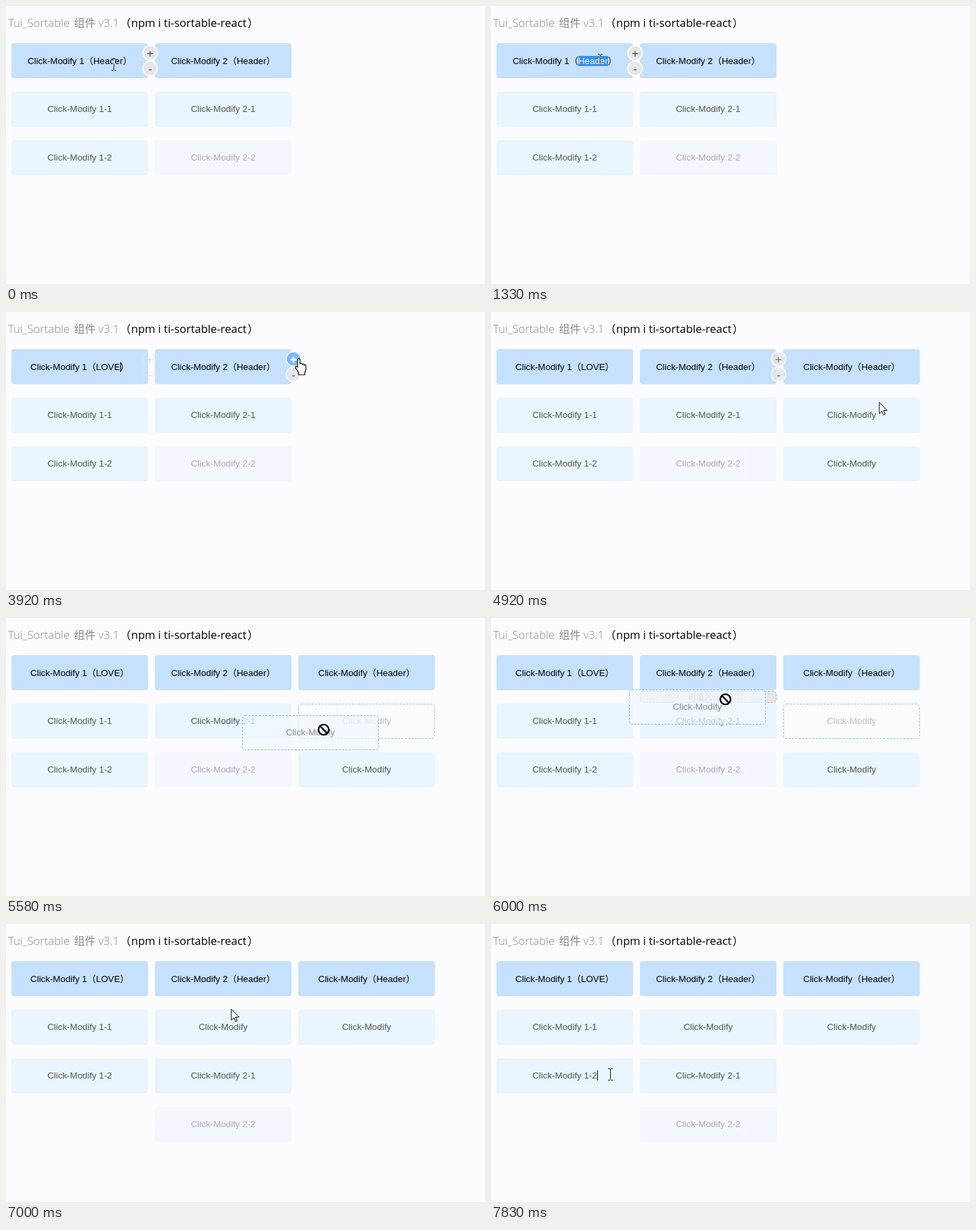
Write an HTML page that moves like this. It is 708 px wide and 412 px high and loops after 8000 ms.

```html
<!DOCTYPE html>
<html lang="zh-CN">
<head>
<meta charset="utf-8">
<title>Sortable</title>
<style>
  html, body { margin: 0; width: 100%; height: 100%; overflow: hidden; background: #fcfcff; }
  svg { display: block; width: 708px; height: 412px; }
  text { font: 13.333px "Liberation Sans", Arial, "Noto Sans CJK SC", sans-serif; white-space: pre; }
  .title { font: 16.5px "Open Sans", "Noto Sans CJK SC", sans-serif; }
  .title .name { font-size: 16.7px; font-weight: 300; fill: #888; }
  .title .cjk { font-family: "Noto Sans CJK SC", sans-serif; font-size: 16px; }
  .mid { text-anchor: middle; }
  .slot { font-size: 12px; }
  .sign { font-size: 17px; text-anchor: middle; }
  .ibeam { mix-blend-mode: difference; }
</style>
</head>
<body>
<svg id="stage" viewBox="0 0 708 412"></svg>
<script>
const LOOP = 8000, STEP = 1000 / 12;
const W = 202, H = 52;
const colX = c => 8 + c * 212;
const rowY = r => 55 + r * 72;

// Moments in units of 1/12 s
const CLICK = 14, SELECT = 16, TYPE = 23, HOVER = 40, ADD = 48, LEAVE = 56.5;
const DRAG = 66, SLOT = 71, DROP = 79, EDIT = 94;

const clamp = v => Math.min(1, Math.max(0, v));
const smooth = t => t * t * (3 - 2 * t);
const easeIn = t => t * t;
const easeOut = t => 1 - (1 - t) ** 3;
const span = (k, a, b) => clamp((k - a) / (b - a));
const bump = (k, a, b) => Math.sin(Math.PI * span(k, a, b));

const MOVES = [
  { from: 0, to: 8, x: 161.5, y: 79.5, ease: smooth },
  { from: 37, to: 47, x: 432, y: 69, ease: smooth },
  { from: 55, to: 59, x: 573.5, y: 133, ease: smooth },
  { from: 59, to: 65, x: 576, y: 141, ease: easeOut },
  { from: 65, to: 67, x: 469, y: 165, ease: easeIn },
  { from: 67, to: 75, x: 340, y: 118, ease: easeOut },
  { from: 83, to: 90, x: 205, y: 259, ease: smooth },
  { from: 90, to: 94, x: 176, y: 222, ease: easeOut }
];

function pointerAt(k) {
  let x = 159, y = 86;
  for (const m of MOVES) {
    const f = m.ease(span(k, m.from, m.to));
    x += (m.x - x) * f;
    y += (m.y - y) * f;
  }
  return [x, y - 50 * bump(k, 0, 8)];
}

const fade = (k, from) => smooth(span(k, from, from + 9));
const buttonAlpha = (k, c) => c
  ? fade(k, HOVER) - fade(k, LEAVE)
  : 1 - fade(k, HOVER) - .35 * bump(k, 1, 8);

const box = (x, y, w, h, attrs) =>
  `<rect x="${x}" y="${y}" width="${w}" height="${h}" rx="4" ${attrs}/>`;
const dashed = (x, y, w, h, fill, stroke) =>
  box(x + .5, y + .5, w - 1, h - 1, `fill="${fill}" stroke="${stroke}" stroke-dasharray="3 2"`);
const label = (x, baseline, fill, str) =>
  `<text class="mid" x="${x + W / 2}" y="${baseline}" fill="${fill}">${str}</text>`;
const caret = (x, y) => `<rect x="${x}" y="${y}" width="1" height="15" fill="#000"/>`;

const STYLES = {
  head: { bg: '#c5e1ff', ink: '#000', base: 31 },
  item: { bg: '#e9f5ff', ink: '#555', base: 30 },
  off: { bg: '#f4f7ff', ink: '#aaa', base: 30 }
};

function card(c, r, str, kind = 'item') {
  const { bg, ink, base } = STYLES[kind];
  const x = colX(c), y = rowY(r);
  return box(x, y, W, H, `fill="${bg}"`) + label(x, y + base, ink, str);
}

const TITLE = `<text class="title" y="31">
  <tspan class="name" x="3">Tui_Sortable</tspan><tspan class="name cjk" x="100.5">组件</tspan><tspan class="name" x="136.5">v3.1</tspan>
  <tspan class="cjk" x="168.5">（</tspan><tspan x="185">npm i ti-sortable-react</tspan><tspan class="cjk" x="357">）</tspan></text>`;

function firstHeader(k) {
  const typed = Math.min(4, Math.max(0, Math.floor((k - 20.5) / 2.35)));
  const selected = k >= SELECT && k < TYPE;
  const word = typed ? 'LOVE'.slice(0, typed) : selected ? '<tspan fill="#fff">Header</tspan>' : 'Header';
  let out = box(8, 55, W, H, `fill="${STYLES.head.bg}"`);
  if (selected) out += '<rect x="129" y="74" width="44" height="15" fill="#3390ff"/>';
  out += label(8, 86, '#000', `Click-Modify 1（${word}）`);
  if (k >= CLICK && k < SELECT) out += caret(161, 74);
  const blinkOn = k < 30 || Math.floor((k - 30) / 6) % 2 === 0;
  if (typed && k < ADD && blinkOn) out += caret(Math.floor(151 + 4.5 * typed), 74);
  return out;
}

function thirdColumn(k) {
  const second = k < DROP ? card(2, 2, 'Click-Modify') : '';
  const first = k >= DRAG && k < DROP
    ? dashed(432, 127, W, H, '#fcfcff', '#7cc0f3') + label(432, 157, '#bbb', 'Click-Modify')
    : card(2, 1, 'Click-Modify');
  return `<g opacity="${clamp((k - ADD + 1) / 5)}">` +
    card(2, 0, 'Click-Modify（Header）', 'head') + first + second + '</g>';
}

function cards(k) {
  const shift = k >= DROP ? 1 : 0;
  return firstHeader(k) + card(1, 0, 'Click-Modify 2（Header）', 'head') +
    card(0, 1, 'Click-Modify 1-1') + card(0, 2, 'Click-Modify 1-2') +
    (shift ? card(1, 1, 'Click-Modify') : '') +
    card(1, 1 + shift, 'Click-Modify 2-1') + card(1, 2 + shift, 'Click-Modify 2-2', 'off') +
    (k >= ADD ? thirdColumn(k) : '') + (k >= EDIT ? caret(157, 217) : '');
}

const SIGNS = [['+', 69.5], ['-', 92.5]];
const overButton = (x, y, c, cy) => Math.hypot(x - 213 - c * 212, y - cy) < 11;

function buttons(k, x, y) {
  return [0, 1].map(c => {
    const cx = 213 + c * 212;
    const pair = SIGNS.map(([sign, cy]) => {
      const hot = overButton(x, y, c, cy);
      return `<circle cx="${cx}" cy="${cy}" r="10.75" fill="${hot ? '#69b1ff' : '#e6e6e6'}" stroke="#fff" stroke-width="1.5"/>` +
        `<text class="sign" x="${cx}" y="${cy + 6}" fill="${hot ? '#fff' : '#444'}" stroke="${hot ? '#fff' : 'none'}">${sign}</text>`;
    });
    return `<g opacity="${clamp(buttonAlpha(k, c))}">${pair.join('')}</g>`;
  }).join('');
}

function ghost(k) {
  if (k < DRAG || k >= DROP) return '';
  const [px, py] = pointerAt(k - .25);  // trails the pointer slightly
  const x = Math.round(px - 145), y = Math.round(py - 15);
  const slot = k < SLOT ? '' : dashed(220, 108, W, 18, '#e6e6e6', '#aaa') +
    '<text class="mid slot" x="309" y="122" fill="#999">可填入</text>';
  return slot + box(x, y, W, H, 'fill="#f1f8ff" opacity=".74"') +
    dashed(x, y, W, H, 'none', '#6cb8f2') + label(x, y + 30, '#888', 'Click-Modify');
}

const SHAPES = {
  arrow: '<path d="M.5.5V17L4.3 13.4 6.8 19 9.2 18 6.8 12.5H12Z" fill="#fff" stroke="#000"/>',
  ibeam: '<path d="M-3.5-8H-1L0-7 1-8H3.5M0-7V8M-3.5 9H-1L0 8 1 9H3.5" fill="none" stroke="#fff"/>',
  hand: '<path d="M-1.6 12V1.4a1.8 1.8 0 0 1 3.6 0V8a1.6 1.6 0 0 1 3.2.4 1.6 1.6 0 0 1 3 .8 1.4 1.4 0 0 1 2.5 1.2V16c0 2-1.2 3-1.6 4.5v3H0v-3C-1 18-4.3 14.5-4.8 12.5c-.2-2 1.8-2 3.2-.5Z" fill="#fff" stroke="#000" stroke-width="1.2"/>',
  no: '<g fill="none" stroke="#000" stroke-width="2.4"><circle r="7.6" fill="#fff" fill-opacity=".5"/><path d="M-5.3-5.3 5.3 5.3"/></g>'
};

function pointerKind(k, x, y) {
  if (k >= DRAG && k < DROP) return 'no';
  const onButton = [0, 1].some(c => buttonAlpha(k, c) > 0 && SIGNS.some(s => overButton(x, y, c, s[1])));
  if (onButton) return 'hand';
  const inX = (x - 8) % 212, inY = (y - 55) % 72;
  const inField = y > 55 && inX > 16 && inX < 188 && inY > 14 && inY < 38;
  return inField ? 'ibeam' : 'arrow';
}

function pointer(k, x, y) {
  const kind = pointerKind(k, x, y);
  return `<g class="${kind}" transform="translate(${Math.floor(x) + .5} ${Math.floor(y) + .5})">${SHAPES[kind]}</g>`;
}

const stage = document.getElementById('stage');
function render(k) {
  const [x, y] = pointerAt(k);
  stage.innerHTML = '<rect width="708" height="412" fill="#fcfcff"/>' + TITLE +
    cards(k) + buttons(k, x, y) + ghost(k) + pointer(k, x, y);
}

// Steps begin on times rounded to 10 ms
function stepAt(t) {
  const k = Math.floor(t / STEP) + 1;
  return Math.round(k * STEP / 10) * 10 > t ? k - 1 : k;
}

let shown = -1;
const start = performance.now();
function tick() {
  const k = stepAt((performance.now() - start) % LOOP) % 96;
  if (k !== shown) render(shown = k);
  requestAnimationFrame(tick);
}
tick();
</script>
</body>
</html>
```
